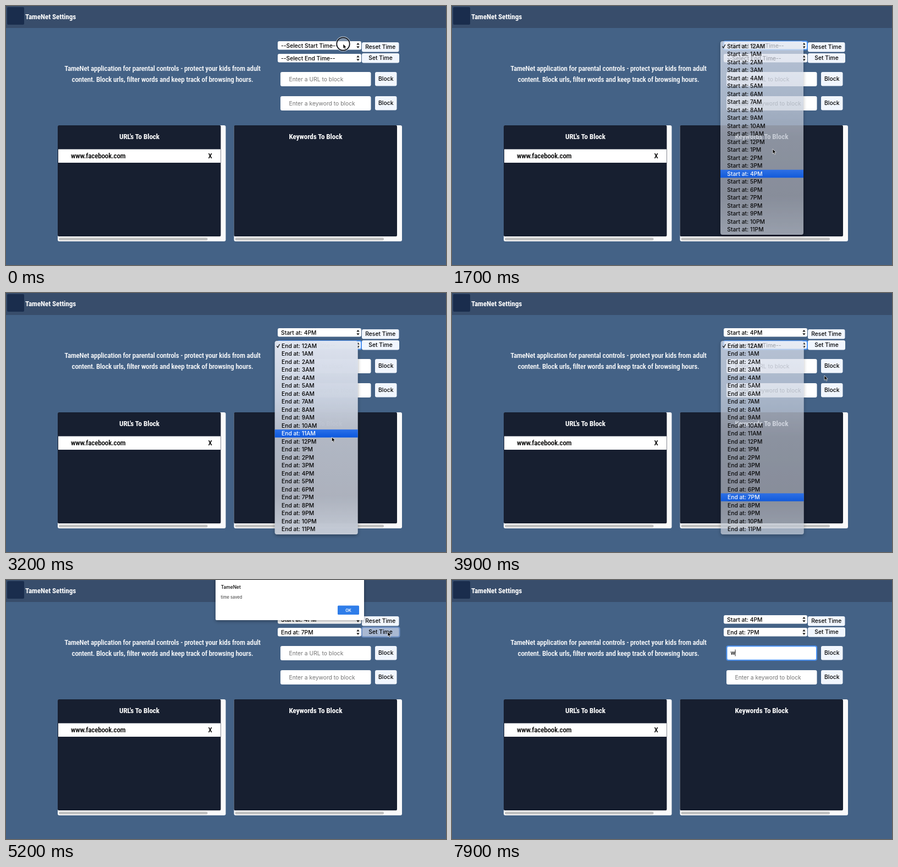
These frames come from a looping animation (800x471 px, 8000 ms). An HTML page:

```html
<!DOCTYPE html>
<html lang="en">
<head>
<meta charset="utf-8">
<title>TameNet Settings</title>
<style>
  html, body { margin: 0; width: 100%; height: 100%; overflow: hidden; background: #446286; }
  svg { display: block; width: 100%; height: 100%; }
  text { font: 500 10.3px Inter, "Liberation Sans", sans-serif; fill: #000; white-space: pre; }
  .narrow, .bold { font-family: var(--face, Lato), sans-serif; font-stretch: extra-condensed; }
  .bold { font-weight: 700; }
  .light { fill: #fff; }
  .hint { fill: #757575; font-weight: 400; }
  .mid { text-anchor: middle; }
</style>
</head>
<body>
<svg id="stage" viewBox="0 0 800 471" preserveAspectRatio="none">
  <defs>
    <linearGradient id="glass" x2="0" y2="1">
      <stop offset="0" stop-color="#e1e6f1"/>
      <stop offset=".3" stop-color="#cbd3e1"/>
      <stop offset=".5" stop-color="#b5bbc8"/>
      <stop offset=".8" stop-color="#b0b5c1"/>
      <stop offset="1" stop-color="#c7ced9"/>
    </linearGradient>
    <linearGradient id="pick" x2="0" y2="1">
      <stop offset="0" stop-color="#2a6fe8"/>
      <stop offset="1" stop-color="#0c58de"/>
    </linearGradient>
    <filter id="shadow" x="-10%" y="-10%" width="120%" height="130%">
      <feDropShadow dx="0" dy="2" stdDeviation="3" flood-opacity=".35"/>
    </filter>
  </defs>
</svg>
<script>
const LOOP = 8000, STEP = 100, ROW = 14.5;
const stage = document.getElementById('stage');

function add(tag, attrs, parent = stage, content = '') {
  const node = document.createElementNS('http://www.w3.org/2000/svg', tag);
  for (const key in attrs) node.setAttribute(key, attrs[key]);
  node.textContent = content;
  parent.append(node);
  return node;
}
const box = (x, y, width, height, fill, rx = 0, parent, more) =>
  add('rect', { x, y, width, height, fill, rx, ...more }, parent);
const label = (x, y, content, kind = '', parent) =>
  add('text', { x, y, class: kind }, parent, content);
const show = (node, on) => node.setAttribute('opacity', Number(on));

// Use the narrowest installed face; size and tracking follow its average advance.
function setNarrowFace() {
  const faces = ['PT Sans Narrow', 'Roboto Condensed', 'Open Sans', 'Noto Sans', 'Roboto', 'Lato'];
  const measure = (kind, face, sample) => {
    const probe = add('text', { class: kind, style: `font-size:100px;font-family:"${face}",Lato,sans-serif` }, stage, sample);
    const advance = probe.getComputedTextLength() / sample.length / 100;
    probe.remove();
    return advance;
  };
  const sentence = 'application for parental controls - protect your kids from adult';
  const face = faces.reduce((best, name) =>
    measure('narrow', name, sentence) < measure('narrow', best, sentence) - .005 ? name : best);
  stage.style.setProperty('--face', `"${face}"`);
  const fit = (kind, sample, advance) => {
    const unit = measure(kind, face, sample);
    const size = Math.min(14.2, Math.max(13.2, advance / unit));
    return `.${kind} { font-size: ${size}px; letter-spacing: ${advance - size * unit}px; }`;
  };
  const sheet = document.createElement('style');
  sheet.textContent = fit('narrow', sentence, 4.83) + fit('bold', 'Keywords To Block', 5.7);
  document.head.append(sheet);
}

function select(y) {
  box(494, y, 152, 15.5, '#fff', 3);
  add('path', { d: `M637.3 ${y + 6.6}l2.7-3.8 2.7 3.8zm0 2.6l2.7 3.8 2.7-3.8z`, fill: '#222' });
  return label(500, y + 11.6, '');
}

function button(x, y, width, height, content) {
  const face = box(x, y, width, height, '#f1f6fe', 3);
  label(x + width / 2, y + height / 2 + 3.7, content, 'mid');
  return face;
}

function field(y, content) {
  box(499, y, 164.5, 26, '#fff', 3);
  button(671, y, 39.5, 25.5, 'Block');
  return label(514.5, y + 16.6, content, 'hint');
}

function panel(x, title, center) {
  box(x, 217, 305.5, 211, '#fafafa', 3);
  box(x, 217, 296.5, 202, '#171f30', 2);
  box(x + 2, 421.2, 270.5, 5, '#c1c1c1', 2.5);
  label(center, 242, title, 'bold light mid');
}

// The glass fades ahead of the rows lying on it.
function menu(x, y, word) {
  const glass = box(x, y, 151, 352, 'url(#glass)', 4, stage, { filter: 'url(#shadow)', 'fill-opacity': .97 });
  const ink = add('g', {});
  const bar = box(x, y, 151, ROW, 'url(#pick)', 0, ink);
  const top = y + 1.75;
  const rows = Array.from({ length: 24 }, (_, i) =>
    label(x + 12.3, top + i * ROW + 11, `${word} at: ${i % 12 || 12}${i < 12 ? 'AM' : 'PM'}`, '', ink));
  const tick = add('path', { d: `M${x + 3.5} ${top + 7.6}l2 2.6 3.3-6`, fill: 'none', 'stroke-width': 1.3 }, ink);
  return (t, opens, chosenAt, fades, choice, pointerY) => {
    const alpha = t < opens ? 0 : Math.max(0, Math.min(1, 1 - (t - fades) / 290));
    show(glass, alpha);
    show(ink, Math.min(1, alpha * 1.25));
    const hovered = Math.max(0, Math.min(23, Math.floor((pointerY - top) / ROW)));
    const active = t >= chosenAt ? choice : hovered;
    bar.setAttribute('y', top + active * ROW);
    rows.forEach((row, i) => row.setAttribute('class', i === active ? 'light' : ''));
    tick.setAttribute('stroke', active ? '#111' : '#fff');
  };
}

setNarrowFace();

// Page
box(0, 0, 800, 471, '#446286');
box(0, 0, 800, 40, '#384d6b');
box(2, 2, 31, 32, '#1a2d4d', 2);
label(35, 24, 'TameNet Settings', 'bold light');
label(284.5, 118, 'TameNet application for parental controls - protect your kids from adult', 'narrow light mid');
label(284.5, 137.5, 'content. Block urls, filter words and keep track of browsing hours.', 'narrow light mid');

const startText = select(64), endText = select(87);
const focus = (x, y, w, h) => box(x, y, w, h, 'none', 3, stage, { stroke: '#4b93f5', 'stroke-width': 2 });
button(647, 66, 67.5, 17.5, 'Reset Time');
const setButton = button(647, 86, 68, 17.5, 'Set Time');
const urlHint = field(120, 'Enter a URL to block');
field(164, 'Enter a keyword to block');
const typed = label(506.5, 136.4, 'w');
const caret = box(506.5, 126.5, .9, 12, '#111');
const startFocus = focus(494, 64, 152, 15.5);
const endFocus = focus(494, 87, 152, 15.5);
const setFocus = focus(647, 86, 68.5, 17.5);
const urlFocus = focus(499.5, 120.3, 163.5, 25.4);

panel(94, "URL's To Block", 242.5);
panel(414.5, 'Keywords To Block', 563);
box(95, 260.5, 295, 24.5, '#fff');
label(118, 277, 'www.facebook.com', 'narrow');
label(367.5, 277, 'X', 'narrow');

const startMenu = menu(488, 64, 'Start');
const endMenu = menu(488.7, 87, 'End');

// Alert
const alertBox = add('g', {});
box(381, -6, 270, 79, '#fff', 2, alertBox, { filter: 'url(#shadow)' });
label(390.7, 16.3, 'TameNet', '', alertBox).style.fontSize = '8.4px';
const note = label(390.5, 33.6, 'time saved', '', alertBox);
note.style.cssText = 'font-size:7.5px;fill:#555';
box(603, 46.5, 39, 16.5, '#2f7de9', 1.5, alertBox);
label(622.5, 57.5, 'OK', 'mid light', alertBox).style.cssText = 'font-size:7.2px;font-weight:600';

// Pointer
const pointer = add('g', {});
const ring = add('g', {}, pointer);
add('circle', { r: 12.2, fill: '#fff', 'fill-opacity': .3, stroke: '#fff', 'stroke-width': 3, 'stroke-opacity': .6 }, ring);
add('circle', { r: 11.7, fill: 'none', stroke: '#0b0f18', 'stroke-width': 1.8 }, ring);
const arrow = add('path', {
  d: 'M0 0V8.6L2 6.8 3.4 10 4.9 9.4 3.5 6.2H6.2Z',
  fill: '#000', stroke: '#fff', 'stroke-width': .7
}, pointer);
const beam = add('path', { d: 'M-2-5Q0-5 0-4Q0-5 2-5M0-4V5M-2 6Q0 6 0 5Q0 6 2 6', fill: 'none', stroke: '#222' }, pointer);

const route = [
  [0, 613, 69], [400, 613, 69], [1300, 590, 304], [1500, 590, 304], [1700, 583, 260],
  [2050, 594, 95], [2500, 593, 94], [2800, 593, 94], [3500, 592, 371], [3700, 592, 371],
  [3900, 677, 150], [4200, 694, 94], [5500, 694, 94], [6100, 623, 54], [6400, 623, 54],
  [6700, 594, 151], [6950, 586, 132], [8000, 586, 132]
];
const clicks = [-100, 1400, 2100, 3600, 4500, 6200, 6950];

function pointerAt(t) {
  const i = route.findIndex(stop => stop[0] > t);
  const [t0, x0, y0] = route[i - 1], [t1, x1, y1] = route[i];
  const p = (t - t0) / (t1 - t0), ease = p * p * (3 - 2 * p);
  return [x0 + (x1 - x0) * ease, y0 + (y1 - y0) * ease];
}

function draw(t) {
  const between = (from, to) => t >= from && t < to;
  const [x, y] = pointerAt(t);
  pointer.setAttribute('transform', `translate(${x} ${y})`);
  show(pointer, t < 7700);
  show(ring, clicks.some(c => between(c, c + 200)));
  const overField = x > 499 && x < 663 && y > 120 && y < 146 && t > 6700;
  show(arrow, !overField);
  show(beam, overField);

  startText.textContent = t < 1900 ? '--Select Start Time--' : 'Start at: 4PM';
  endText.textContent = t < 4100 ? '--Select End Time--' : 'End at: 7PM';
  startMenu(t, 100, 1500, 1630, 16, y);
  endMenu(t, 2200, 3700, 3830, 19, y);
  show(startFocus, between(100, 2100));
  show(endFocus, between(2100, 4500));

  setButton.setAttribute('fill', between(4500, 6400) ? '#a9b9d3' : '#f1f6fe');
  show(setFocus, between(4500, 7000));
  setFocus.setAttribute('stroke', t < 6400 ? '#6d8fc4' : '#3f87f2');
  show(alertBox, between(4800, 6400));

  const hasLetter = t >= 7700;
  show(urlFocus, t >= 7000);
  show(urlHint, !hasLetter);
  show(typed, hasLetter);
  show(caret, hasLetter || between(7000, 7500));
  caret.setAttribute('x', hasLetter ? 514.6 : 506.5);
}

function tick() {
  draw(Math.floor(performance.now() % LOOP / STEP) * STEP);
  requestAnimationFrame(tick);
}
tick();
</script>
</body>
</html>
```
